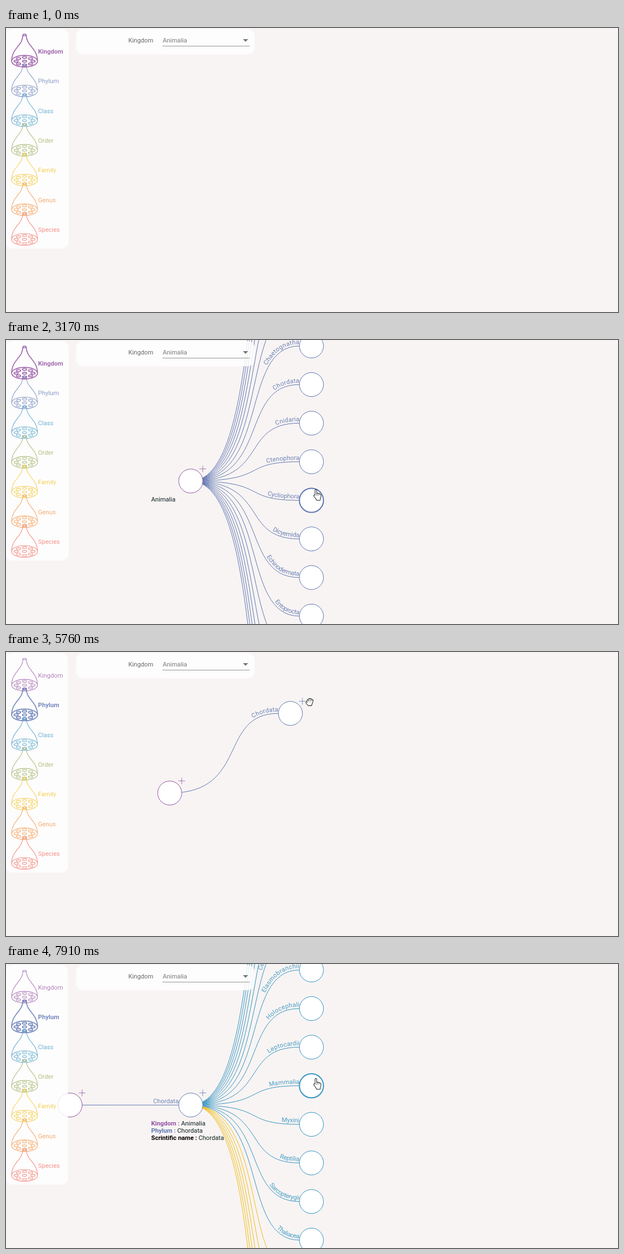
Recreate the animation shown at these times as an HTML page. Size 1098 by 510 pixels, loop 8000 ms.

```html
<!DOCTYPE html>
<html lang="en">
<head>
<meta charset="utf-8">
<title>Taxonomy tree</title>
<style>
html, body { margin: 0; width: 100%; height: 100%; overflow: hidden; background: #f8f4f3; }
svg { display: block; width: 1098px; height: 510px; font: 11.2px Roboto, sans-serif; }
</style>
</head>
<body>
<svg id="stage" viewBox="0 0 1098 510"></svg>
<script>
const LOOP = 8000, MOVE_TIME = 750;
const FIRST_CLICK = 2170, FIRST_MOVE = 2416, SECOND_CLICK = 5380, SECOND_MOVE = 5497;
const MID = 253.3, GAP = 69.3, LEVEL = 216.5, PARENT_X = 331.5, CHILD_X = PARENT_X + LEVEL, R = 21.6;
const FLY_IN = 2500, CHILDREN = 20, FIRST_NAMED = 5, CHORDATA = 7, FIRST_UNRANKED = 14;

const ranks = [
  ['Kingdom', '#9353a3'], ['Phylum', '#5f77b3'], ['Class', '#3595c2'], ['Order', '#8fa851'],
  ['Family', '#f0bd19'], ['Genus', '#f08a37'], ['Species', '#ee6a5c']
];
const [PURPLE, BLUE, CYAN, , YELLOW] = ranks.map(rank => rank[1]);
const phyla = 'Cephalorhyncha Chaetognatha Chordata Cnidaria Ctenophora Cycliophora Dicyemida Echinodermata Entoprocta'.split(' ');
const classes = 'Cephalaspidomorphi Elasmobranchii Holocephali Leptocardii Mammalia Myxini Reptilia Sarcopterygii Thaliacea'.split(' ');

const mouseStart = { x: 611, y: 490 };
const mouseMoves = [
  { start: 1090, end: 1630, x: 567.5, y: 284 },
  { start: 1860, end: 2020, x: 554, y: 267 },
  { start: 3670, end: 4830, x: 545, y: 90 },
  { start: 7240, end: 7910, x: 554, y: 204 }
];

const clamp = v => Math.max(0, Math.min(1, v));
const cubicInOut = u => u < .5 ? 4 * u ** 3 : 1 - 4 * (1 - u) ** 3;
const remaining = (t, start) => cubicInOut(clamp(1 - (t - start) / MOVE_TIME));
const childY = i => MID + GAP * (i - (CHILDREN - 1) / 2);
const text = (x, y, content, attrs = '') => `<text x="${x}" y="${y}" ${attrs}>${content}</text>`;
const ellipse = (x, y, rx, ry) => `<ellipse cx="${x}" cy="${y}" rx="${rx}" ry="${ry}"/>`;

function mouseAt(t) {
  if (t < mouseMoves[0].start) return null;
  let { x, y } = mouseStart;
  for (const move of mouseMoves) {
    const k = Math.sin(clamp((t - move.start) / (move.end - move.start)) * Math.PI / 2);
    x += (move.x - x) * k;
    y += (move.y - y) * k;
  }
  return { x, y };
}

function funnel([name, color], i, active) {
  const x = 33.3, y = 59.6, neck = 12.6;
  let shape = ellipse(x, neck, 3, 1.4) + ellipse(x, y, 23.2, 10.5) + ellipse(x, y, 3.8, 1.8);
  for (let a = 0; a < 8; a++) {
    shape += ellipse(x + 15.2 * Math.cos(a * Math.PI / 4), y + 6.8 * Math.sin(a * Math.PI / 4), 3.8, 1.8);
  }
  for (const side of [-1, 1]) {
    shape += `<path d="M${x + 3 * side} ${neck}C${x + 3 * side} 32 ${x + 23.2 * side} 36 ${x + 23.2 * side} ${y}"/>`;
  }
  return `<g transform="translate(0 ${i * 53.35})" opacity="${active ? .85 : .72}">
    <g fill="none" stroke="${color}" stroke-width="${active ? 1.7 : 1.1}">${shape}</g>
    ${text(57.5, 46, name, `fill="${color}" font-weight="${active ? 700 : 400}"`)}</g>`;
}

function panels(activeRank) {
  return `<g fill="#fff" fill-opacity=".85">
      <rect y="2" width="${activeRank ? 111 : 112}" height="394" rx="12"/>
      <rect x="126" y="2" width="320" height="45" rx="12"/></g>
    ${ranks.map((rank, i) => funnel(rank, i, i === activeRank)).join('')}
    ${text(219.5, 26, 'Kingdom', 'fill="#66666c"')}${text(281.3, 26, 'Animalia', 'fill="#77777c"')}
    <path d="M281 32.5H437" stroke="#949494"/><path d="M425 20H434.5L429.7 24.8Z" fill="#757575"/>`;
}

let linkCount = 0;
function link(x1, y1, x2, y2, color, name = '') {
  const id = 'link' + linkCount++, dx = x2 - x1;
  return `<path id="${id}" fill="none" stroke="${color}" d="M${x1} ${y1}C${x1 + dx * .66} ${y1} ${x1 + dx * .4} ${y2} ${x2 - R} ${y2}"/>
    <text dy="-3.5" fill="${color}" opacity=".9" text-anchor="end"><textPath href="#${id}" startOffset="100%">${name}</textPath></text>`;
}

function node(x, y, color, mouse, expanded) {
  const hover = mouse && Math.hypot(mouse.x - x, mouse.y - y) < R + 1;
  const plus = expanded ? `<path d="M${x + 15.5} ${y - 21.8}h12m-6-6v12" stroke="${color}" opacity=".8"/>` : '';
  return { hover, svg: `<circle cx="${x}" cy="${y}" r="${R}" fill="#fff" stroke="${color}" stroke-width="${hover ? 2 : 1}"/>${plus}` };
}

// Children fly in from the right together with their links.
function column(shift, names, colorOf, mouse) {
  const links = [], nodes = [];
  for (let i = 0; i < CHILDREN && shift < 500; i++) {
    const x = CHILD_X + shift, y = childY(i);
    links.push(link(PARENT_X + shift, MID, x, y, colorOf(i), names[i - FIRST_NAMED]));
    nodes.push(node(x, y, colorOf(i), mouse));
  }
  return { links, nodes };
}

function info(x, y, rest, lines) {
  if (rest > .15) return '';
  const left = x - 71;
  const rows = lines.map(([value, label, color], i) =>
    text(left, y + 36.8 + i * 13, `${label ? `<tspan font-weight="700" fill="${color}">${label} :</tspan> ` : ''}${value}`)).join('');
  if (rest < .01) return `<g fill="#0c1f1f">${rows}</g>`;
  return `<clipPath id="reveal"><rect x="${left}" y="${y + 20}" width="150" height="23"/></clipPath>
    <g fill="#2a702a" clip-path="url(#reveal)">${rows}</g>
    <path d="M${x + 70} ${y + 27}v15" stroke="#1f7a1f" stroke-width="2"/>`;
}

function tree(t, mouse) {
  let links = [], nodes = [], note = '';
  if (t >= SECOND_MOVE) {
    const rest = remaining(t, SECOND_MOVE), x = PARENT_X + LEVEL * rest;
    const y = MID + (childY(CHORDATA) - MID) * rest;
    ({ links, nodes } = column(FLY_IN * rest, classes, i => i < FIRST_UNRANKED ? CYAN : YELLOW, mouse));
    links.push(link(x - LEVEL, MID, x, y, BLUE, 'Chordata'));
    nodes.push(node(x - LEVEL, MID, PURPLE, mouse, true), node(x, y, BLUE, mouse, true));
    note = info(x, y, rest, [['Animalia', 'Kingdom', PURPLE], ['Chordata', 'Phylum', BLUE], ['Chordata', 'Scrintific name', '#000']]);
  } else if (t >= FIRST_MOVE) {
    const rest = remaining(t, FIRST_MOVE), x = PARENT_X + LEVEL * rest;
    ({ links, nodes } = column(FLY_IN * rest, phyla, () => BLUE, mouse));
    nodes.push(node(x, MID, PURPLE, mouse, true));
    note = info(x, MID, rest, [['Animalia']]);
  } else if (t >= 310) {
    nodes = [node(CHILD_X + 330 * clamp((530 - t) / 220) ** 3, MID, PURPLE, mouse)];
  }
  return { svg: links.join('') + nodes.map(n => n.svg).join('') + note, hover: nodes.some(n => n.hover) };
}

// Each finger is a white line inside a thicker black one.
function cursor({ x, y }, hover) {
  const hand = hover
    ? 'M2 3V14M4.7 9.5V14M7.3 10V14M9.5 11.5V15M-.5 12.5L3 17M2.5 14H8.5V19.5H4Z'
    : 'M-4-2.5L-2 2M-1.2-5L-.5 2M1.7-5V2M4.5-3L3 2M-5.5 1L-2 5M-2 2H3L2 5H-2Z';
  return `<g transform="translate(${x} ${y})" fill="#fff" stroke-linecap="round" stroke-linejoin="round">
    <path d="${hand}" stroke="#111" stroke-width="4"/><path d="${hand}" stroke="#fff" stroke-width="2.1"/></g>`;
}

const stage = document.getElementById('stage');
function draw() {
  const t = performance.now() % LOOP, mouse = mouseAt(t);
  linkCount = 0;
  const { svg, hover } = tree(t, mouse);
  const pressed = t >= FIRST_CLICK && t < FIRST_MOVE || t >= SECOND_CLICK && t < SECOND_MOVE;
  stage.innerHTML = svg + panels(t >= SECOND_MOVE ? 1 : 0)
    + (pressed ? `<circle cx="${mouse.x}" cy="${mouse.y + 1.5}" r="13" fill="#ffff50" opacity=".85"/>` : '')
    + (mouse ? cursor(mouse, hover) : '');
  requestAnimationFrame(draw);
}
draw();
</script>
</body>
</html>
```
